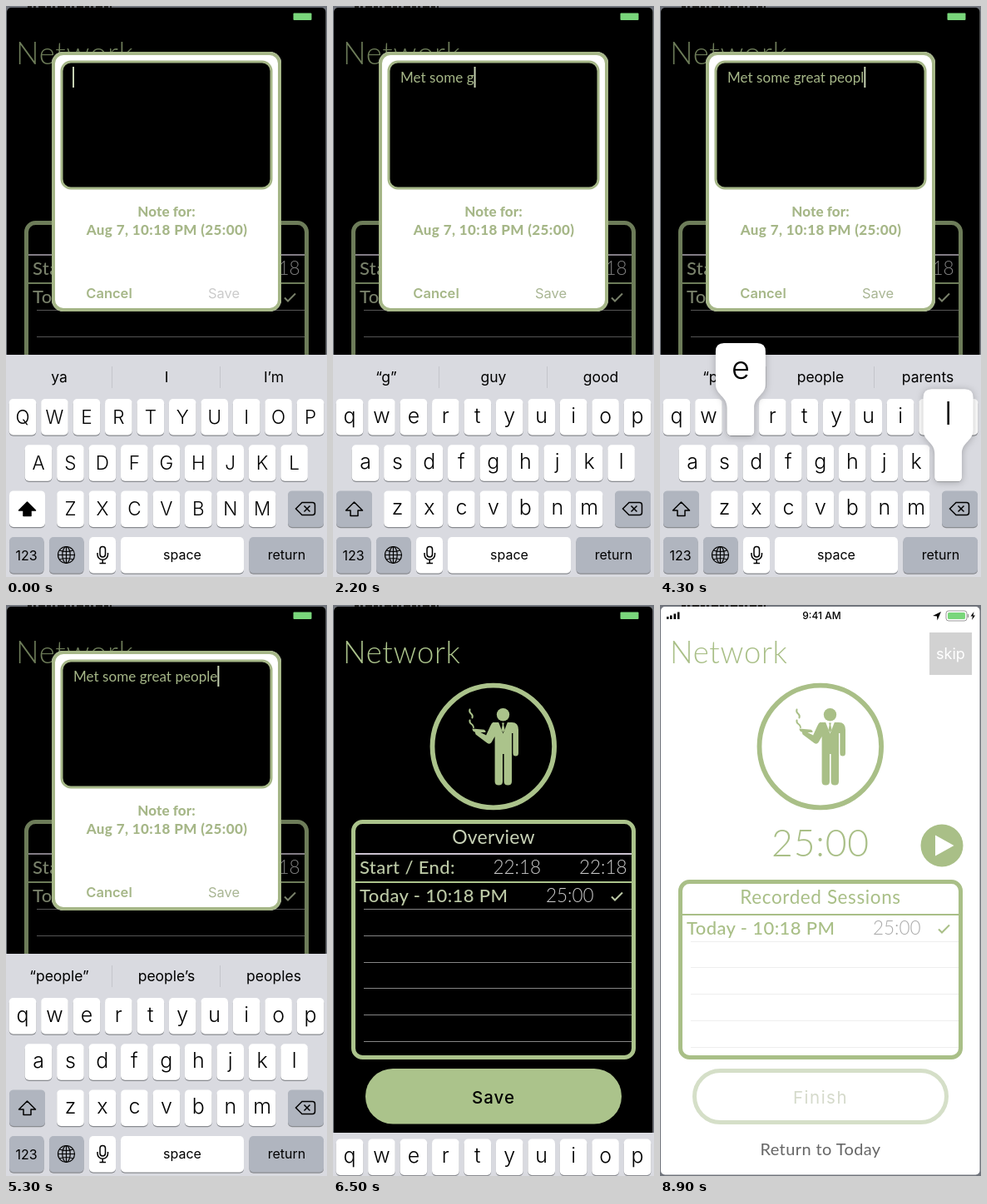
Write an HTML page that moves like this. It is 386 px wide and 686 px high and loops after 9200 ms.

```html
<!DOCTYPE html>
<html lang="en">
<head>
<meta charset="utf-8">
<title>Session note</title>
<style>
  html, body { margin: 0; width: 100%; height: 100%; overflow: hidden; background: #70747c; }
  svg { display: block; width: 386px; height: 686px; }
  text { font-family: Lato, sans-serif; white-space: pre; fill: currentColor; }
  .ui { font-family: Inter, sans-serif; }
  .mid { text-anchor: middle; }
  .end { text-anchor: end; }
  .h1 { font-size: 36.5px; font-weight: 300; letter-spacing: .7px; }
  .row { font-size: 22px; font-weight: 500; letter-spacing: .4px; }
  .num { font-size: 22.5px; font-weight: 300; }
  .line { fill: none; stroke: currentColor; }

  .dark { color: #abc38b; --bg: #000; animation: dissolve 9.2s step-end infinite; }
  .light { color: #a9bf87; --bg: #fff; }
  .dialog { color: #a6b788; }
  .dialog > * { animation: leave 9.2s step-end infinite; }
  .dialog > .plate { animation-name: pale; }
  .dialog > .seam { animation-name: seam; }
  .press { animation: press 9.2s step-end infinite; }
  .keyboard { color: #000; animation: slide 9.2s step-end infinite; }
  .bar { animation: drop 9.2s step-end infinite; }
  .key { fill: #fff; }
  .grey { fill: #b0b5bf; }
  .shade { fill: #898b90; }
  .thin { font-weight: 300; }
  .bubble { fill: #fff; filter: drop-shadow(0 1px 4px rgb(0 0 0 / .25)); }

  @keyframes leave {
    0% { opacity: 1 } 62.8% { opacity: .8 } 63.9% { opacity: .55 } 65% { opacity: .35 }
    66.1% { opacity: .18 } 67.2% { opacity: .06 } 68.3%, 100% { opacity: 0 }
  }
  @keyframes pale {
    0% { opacity: 1 } 62.8% { opacity: .9 } 63.9% { opacity: .75 } 65% { opacity: .56 }
    66.1% { opacity: .32 } 67.2% { opacity: .12 } 68.3%, 100% { opacity: 0 }
  }
  @keyframes seam { 0% { opacity: 0 } 62.8% { opacity: .6 } 67.2%, 100% { opacity: 0 } }
  @keyframes drop { 0% { opacity: 1 } 68.3%, 100% { opacity: 0 } }
  @keyframes slide {
    0% { transform: translateY(0) } 68.3% { transform: translateY(40px) }
    69.35% { transform: translateY(110px) } 70.45% { transform: translateY(169.5px) }
    71.5% { transform: translateY(206px) } 72.6%, 100% { transform: translateY(240px) }
  }
  @keyframes press { 0% { fill-opacity: 1 } 88.9%, 100% { fill-opacity: .6 } }
  @keyframes dissolve {
    0% { opacity: 1 } 91.1% { opacity: .85 } 92.2% { opacity: .6 } 93.3% { opacity: .35 }
    94.4% { opacity: .15 } 95.4%, 100% { opacity: 0 }
  }
</style>
</head>
<body>
<svg viewBox="0 0 386 686">
  <defs>
    <g id="man">
      <circle class="line" cx="192.800" cy="170" r="73.300" stroke-width="5.800"/>
      <g fill="currentColor">
        <circle cx="204.500" cy="131.800" r="7.700"/>
        <path d="M193 141h22q8 0 8 9v28q0 3.500-3.300 3.500t-3.300-3.500v-24h-1.400v58q0 4.500-4.700 4.500t-4.700-4.500v-33h-1.600v33q0 4.500-4.700 4.500t-4.700-4.500v-54l-4 7q-2 3-5 1l-14-10.500q-2-4 2-4.500l10.500 5.500 5-11q1.500-4 4-5z"/>
        <path d="M167.500 148.500l14 1.200q2.500 1 2 3.300h-12q-4-1-4-4.500z"/>
      </g>
      <path d="M199 140.500h11l-5.500 14z" fill="var(--bg)"/>
      <path d="M203 141.500h3l-.7 2.500 1.200 6-2 3-2-3 1.200-6z" fill="currentColor"/>
      <path class="line" stroke-width="2" stroke-linecap="round" d="M164.500 125.500q-1 3 1.500 5t1.500 5M164.500 138.500q-.5 3 2 4.500t2.500 4"/>
    </g>
    <path id="tick" class="line" stroke-width="2" d="M335 350.500l4 4 9-9"/>
  </defs>

  <path d="M26 1h101" stroke="#222" stroke-width="2" stroke-dasharray="5 2 3 3 8 2"/>

  <g class="light">
    <rect x="1" y="2" width="383.500" height="682.500" rx="5" fill="#fff"/>
    <g fill="#000" color="#000">
      <path d="M8 14h2.500v3H8zM12 12.500h2.500V17H12zM16.500 10.500H19V17h-2.500zM21 8.500h2.500V17H21zM338 8l-10 5 5 .5.500 5zM377.500 8l-4 5.500h2.500l-1 4.500 4-5.500h-2.500z"/>
      <text class="ui mid" x="194.500" y="17" font-size="12" font-weight="500">9:41 AM</text>
    </g>
    <rect x="344" y="7" width="25" height="12" rx="3" fill="none" stroke="#999"/>
    <path d="M370.500 11v4" stroke="#999" stroke-width="1.500"/>
    <rect x="346" y="9" width="21" height="8" rx="1.500" fill="#79d67b"/>
    <text class="h1" x="12" y="70">Network</text>
    <rect x="324" y="33" width="51" height="51" fill="#d2d2d2"/>
    <text class="ui mid" x="349.500" y="65" font-size="18" color="#fff">skip</text>
    <use href="#man"/>
    <text class="mid thin" x="193" y="302" font-size="44.500" letter-spacing=".8">25:00</text>
    <circle cx="339" cy="289" r="25.500" fill="currentColor"/>
    <path d="M331 276.500v25l22.500-12.500z" fill="#fff"/>
    <path stroke="#eee" d="M37 404.500h322M37 435.500h322M37 467.500h322M37 499.500h322M37 531.500h322"/>
    <path class="line" stroke-width="2" d="M24 372h338"/>
    <rect class="line" x="24.500" y="332.500" width="337" height="211" rx="11" stroke-width="5"/>
    <text class="mid" x="193" y="359" font-size="22.500" letter-spacing=".6">Recorded Sessions</text>
    <text class="row" x="32" y="396">Today - 10:18 PM</text>
    <text class="num end" x="313.500" y="396" color="#aaa">25:00</text>
    <use href="#tick" y="39"/>
    <rect x="41.500" y="559.500" width="303" height="62" rx="31" fill="none" stroke="#d5dfc8" stroke-width="5"/>
    <text class="ui mid" x="193" y="599" font-size="20.500" letter-spacing="1.500" color="#d5dacb">Finish</text>
    <text class="mid" x="193" y="661" font-size="20" letter-spacing=".4" color="#666">Return to Today</text>
  </g>

  <g class="dark">
    <rect x="1" y="2" width="383.500" height="682.500" rx="5"/>
    <text class="h1" x="12" y="70">Network</text>
    <use href="#man"/>
    <path stroke="#858585" d="M37 365.500h322M37 397.500h322M37 429.500h322M37 460.500h322M37 492.500h322M37 524.500h322"/>
    <path stroke="#cbc3d0" stroke-width="2" d="M25 299h337"/>
    <path class="line" stroke-width="2" d="M25 333h337"/>
    <rect class="line" x="24.500" y="260.500" width="337" height="283" rx="11" stroke-width="5"/>
    <text class="mid" x="193" y="287" font-size="23" letter-spacing=".2" color="#c8d2b7">Overview</text>
    <g color="#bcc9a6">
      <text class="row" x="32" y="323">Start / End:</text>
      <text class="row" x="32" y="357">Today - 10:18 PM</text>
      <use href="#tick"/>
    </g>
    <g color="#c8c8c8">
      <text class="num end" x="250" y="323">22:18</text>
      <text class="num end" x="353.500" y="323">22:18</text>
      <text class="num end" x="313.500" y="357">25:00</text>
    </g>
    <rect class="press" x="39" y="557" width="308" height="66.500" rx="33" fill="currentColor"/>
    <text class="ui mid" x="193" y="599" font-size="20.500" letter-spacing="1" font-weight="500" color="#000">Save</text>
    <text class="mid" x="193" y="661" font-size="20" letter-spacing=".4" color="#777">Return to Focus</text>

    <g class="dialog">
      <rect x="1" y="2" width="383.500" height="682.500" rx="5" fill-opacity=".36"/>
      <rect class="plate" x="55" y="55" width="276" height="312" rx="14" fill="#fff"/>
      <rect class="line" x="57" y="57" width="272" height="308" rx="12" stroke-width="4"/>
      <rect x="67" y="67" width="252" height="152" rx="11" stroke="currentColor" stroke-width="3"/>
      <path class="seam" stroke="#222" d="M55 322.500h276M193.500 323v44"/>
      <text id="note" x="81" y="92" font-size="17" letter-spacing=".05"></text>
      <rect id="caret" y="73" width="2" height="25" fill="#c6d2b2"/>
      <g class="mid" font-weight="800" font-size="17">
        <text x="193" y="253" letter-spacing=".1">Note for:</text>
        <text x="193.500" y="275" letter-spacing=".4">Aug 7, 10:18 PM (25:00)</text>
      </g>
      <text class="ui mid" x="124" y="351" font-size="16.500" font-weight="600">Cancel</text>
      <text id="save" class="ui mid" x="262" y="351" font-size="16.500">Save</text>
    </g>
    <rect x="345.500" y="8.500" width="22" height="8.500" rx="1" fill="#79d67b"/>
  </g>

  <g class="keyboard">
    <g class="bar">
      <rect y="419" width="386" height="46" fill="#d9dae0"/>
      <path stroke="#c4c5cb" d="M127.500 433v26M257.500 433v26"/>
      <g id="hints"></g>
    </g>
    <rect y="464" width="386" height="224" fill="#d9dae0"/>
    <g id="keys"></g>
    <g fill="none" stroke="#000" stroke-width="1.500">
      <path id="arrow" stroke-linejoin="round" d="M25.500 596l10 10h-5.500v6.500h-9V606h-5.500z"/>
      <path d="M356 596.500h12.500a3 3 0 0 1 3 3v9a3 3 0 0 1-3 3H356l-7.500-7.500zM358.500 600.500l7 7m0-7l-7 7"/>
      <g stroke-width="1.200">
        <circle cx="72.500" cy="659.500" r="10"/>
        <ellipse cx="72.500" cy="659.500" rx="4.700" ry="10"/>
        <path d="M62.500 659.500h20M72.500 649.500v20M64.500 654q8 3 16 0M64.500 665q8-3 16 0"/>
      </g>
      <rect x="113" y="649.500" width="6.500" height="12.500" rx="3.200"/>
      <path d="M110 657v2a6.200 6.200 0 0 0 12.500 0v-2M116.200 665.500v4M112.500 669.500h7.500"/>
    </g>
    <g id="pops"></g>
  </g>
</svg>

<script>
const LOOP = 9200, LEAD = 20;
const $ = id => document.getElementById(id);
const phrase = "Met some great people";
// moments when each character lands, in tenths of a second
const beats = [3, 5, 7, 9, 11, 13, 15, 16, 18, 20, 24, 26, 28, 30, 32, 35, 37, 39, 41, 43, 44];
// the bar lags behind while "people" is typed quickly
const lagging = Array(5).fill("“p”,people,parents");
const hints = [
  "ya,I,I’m", "“M”,My,Me", "“Me”,Met,Meet", "“Met”,Meet,Meth", "the,with,a",
  "“s”,some,so", "“so”,some,so", "“som”,some,someone", "“some”,someone,sometimes", "of,people,good",
  "“g”,guy,good", "“gr”,great,group", "“gre”,great,green", "“grea”,great,greatest", "“great”,greatest,greater",
  "people,friends,things", ...lagging, "“people”,people’s,peoples"
].map(s => s.split(","));

const box = (x, y, w, cls = "key", id = "") =>
  `<rect class="shade" x="${x}" y="${y + 1.3}" width="${w}" height="43.5" rx="5"/>` +
  `<rect class="${cls}" id="${id}" x="${x}" y="${y}" width="${w}" height="43.5" rx="5"/>`;
const label = (s, x, y, size, cls = "") =>
  `<text class="ui mid ${cls}" x="${x}" y="${y}" font-size="${size}">${s}</text>`;

const places = {};
let html = "";
[["qwertyuiop", 20], ["asdfghjkl", 39], ["zxcvbnm", 77.5]].forEach(([letters, start], r) => {
  [...letters].forEach((ch, i) => {
    const x = start + i * 38.45, y = 472 + r * 55.2;
    places[ch] = { x, y };
    html += box(x - 16.3, y, 32.6) + `<text class="ui mid thin letter" x="${x}" data-y="${y}" data-ch="${ch}"></text>`;
  });
});
html += box(4, 582.4, 43, "key", "shift") + box(339, 582.4, 43, "grey")
  + box(4, 638, 41.5, "grey") + box(52, 638, 41.5, "grey") + box(100, 638, 32)
  + box(138, 638, 148, "key", "space") + box(292.5, 638, 89.5, "grey")
  + label("123", 24.5, 665.5, 16) + label("space", 212, 665, 16) + label("return", 337.5, 665, 16);
$("keys").innerHTML = html;
const letters = document.querySelectorAll(".letter");

function setCaps(on) {
  for (const el of letters) {
    el.textContent = on ? el.dataset.ch.toUpperCase() : el.dataset.ch;
    el.setAttribute("y", +el.dataset.y + (on ? 30 : 28.5));
    el.setAttribute("font-size", on ? 22.5 : 25);
  }
  $("shift").setAttribute("class", on ? "key" : "grey");
  $("arrow").setAttribute("fill", on ? "#000" : "none");
}

function popup(ch) {
  const { x, y } = places[ch.toLowerCase()];
  const l = Math.min(Math.max(x - 30, 3), 323), r = l + 60, t = y - 67;
  const a = x - 16.3, b = x + 16.3;
  const d = `M${l + 10} ${t}H${r - 10}Q${r} ${t} ${r} ${t + 10}V${y - 18}`
    + `C${r} ${y - 4} ${b} ${y - 4} ${b} ${y + 11}V${y + 39}Q${b} ${y + 44} ${b - 5} ${y + 44}`
    + `H${a + 5}Q${a} ${y + 44} ${a} ${y + 39}V${y + 11}C${a} ${y - 4} ${l} ${y - 4} ${l} ${y - 18}`
    + `V${t + 10}Q${l} ${t} ${l + 10} ${t}Z`;
  return `<path class="bubble" d="${d}"/>` + label(ch, (l + r) / 2, t + 43, 38, "thin");
}

let shown = -1, held = null;

function showText(n) {
  if (n === shown) return;
  shown = n;
  $("note").textContent = phrase.slice(0, n);
  $("caret").setAttribute("x", n ? 81 + $("note").getComputedTextLength() : 80);
  $("save").setAttribute("color", n ? "#a9b694" : "#cbcbcb");
  $("hints").innerHTML = hints[n].map((s, i) => label(s, [64, 193, 322][i], 452, 17.5)).join("");
  setCaps(n === 0);
}

function showPressed(now) {
  const down = [...phrase].filter((ch, i) => now >= beats[i] - 1 && now < beats[i] + 1).join("");
  if (down === held) return;
  held = down;
  $("pops").innerHTML = [...down].filter(ch => ch !== " ").map(popup).join("");
  $("space").setAttribute("class", down.includes(" ") ? "grey" : "key");
}

let start;
function tick(stamp) {
  start ??= stamp;
  const now = ((stamp - start + LEAD) % LOOP) / 100;
  showText(beats.filter(b => b <= now).length);
  showPressed(now);
  requestAnimationFrame(tick);
}
showText(0);
requestAnimationFrame(tick);
</script>
</body>
</html>
```
